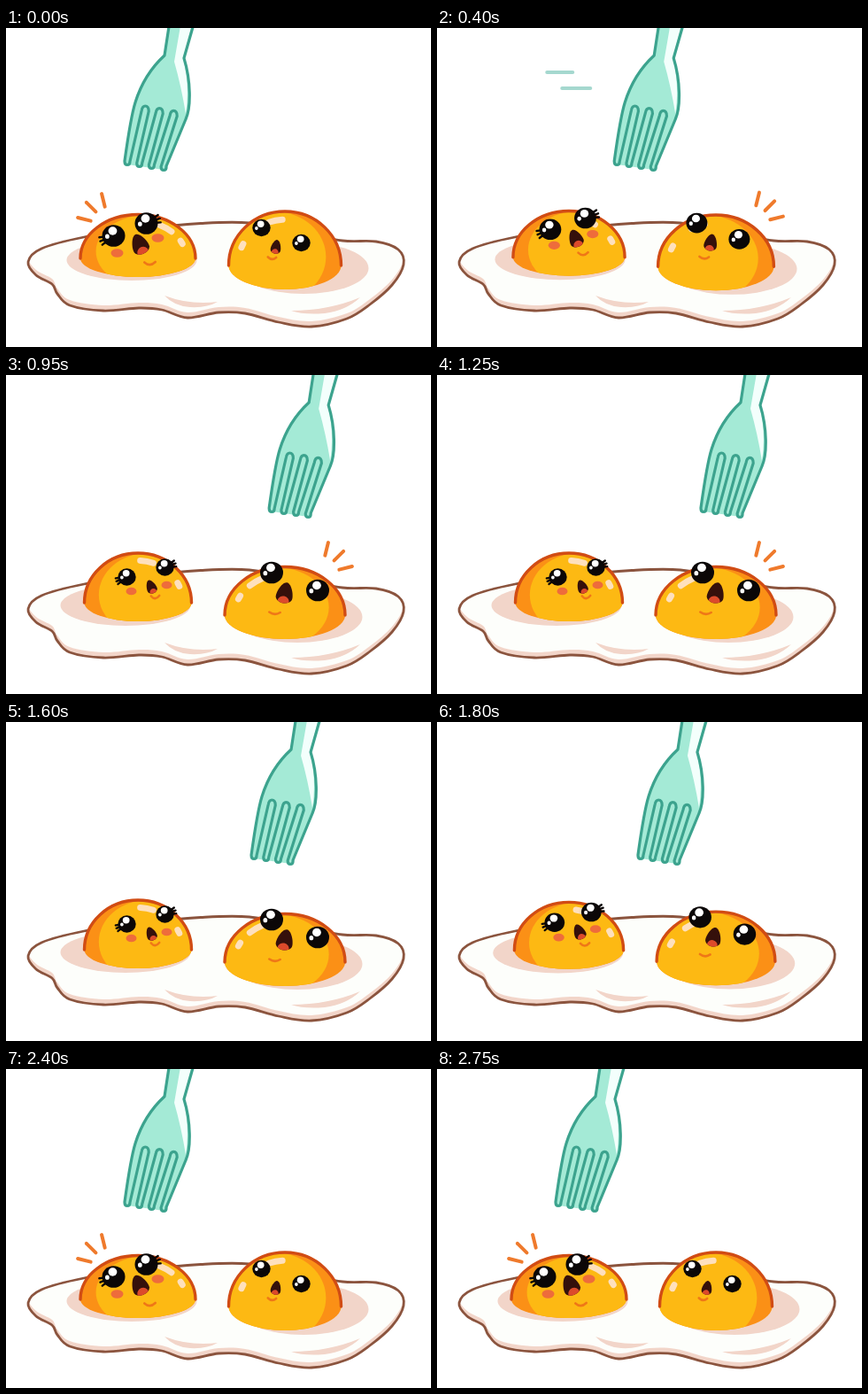
These frames come from a looping animation (480x360 px, 2800 ms). An HTML page with a canvas:

```html
<!DOCTYPE html>
<html lang="en">
<head>
<meta charset="utf-8">
<title>Fried eggs and a fork</title>
<style>
html, body { margin: 0; width: 100%; height: 100%; overflow: hidden; background: #fff; }
canvas { display: block; }
</style>
</head>
<body>
<canvas id="stage" width="480" height="360"></canvas>
<script>
const ctx = document.getElementById('stage').getContext('2d');
const LOOP = 2800, STEP = 50, TRAVEL = 164, DEG = Math.PI / 180;

const INK = '#0b0707', PEACH = '#f2d5c9', RIM = '#d14c14', DEEP = '#fb9016',
      YOLK = '#fdb913', GLOSS = '#fee0bd', ACCENT = '#ef7a2c', TEAL = '#3ca38e', MINT = '#a4ead6';

// Cosine ease from 0 to 1 between two moments; power below 1 gives a quicker start.
function ease(from, to, v, power = 1) {
  const u = Math.min(1, Math.max(0, (v - from) / (to - from)));
  return (1 - Math.cos(Math.PI * u ** power)) / 2;
}

// Smooth closed curve through a few points.
function blob(points) {
  const path = new Path2D(), n = points.length, at = i => points[(i + n) % n];
  path.moveTo(...points[0]);
  points.forEach(([x, y], i) => {
    const [px, py] = at(i - 1), [qx, qy] = at(i + 1), [rx, ry] = at(i + 2);
    path.bezierCurveTo(x + (qx - px) / 6, y + (qy - py) / 6,
                       qx - (rx - x) / 6, qy - (ry - y) / 6, qx, qy);
  });
  path.closePath();
  return path;
}

function forkOutline() {
  const p = new Path2D('M185 -8 L179 31 Q156 52 146 84 Q141 100 134 150');
  for (let i = 0; i < 4; i++) {
    const x = 137 + 13.7 * i, y = 154.5 + 2 * i;
    p.lineTo(x - 3, y - 4);
    p.quadraticCurveTo(x - 3, y, x, y);
    p.quadraticCurveTo(x + 3, y, x + 3, y - 4);
    if (i === 3) break;
    const sx = 157.2 + 16 * i, sy = 88 + 2.7 * i;
    p.lineTo(sx - 4, sy + 5);
    p.quadraticCurveTo(sx - 3, sy, sx, sy);
    p.quadraticCurveTo(sx + 4, sy, sx + 4, sy + 6);
  }
  p.addPath(new Path2D('M181 156 L203 103 C209 90 209 60 201 34 L213 -8'));
  return p;
}

const white = blob([[25, 264], [40, 249], [88, 236], [150, 227], [220, 220.5], [275, 220],
  [335, 231], [380, 240], [418, 241], [443, 250], [449, 267], [436, 290], [411, 312],
  [385, 328], [345, 337], [308, 332], [270, 322], [240, 321], [205, 327], [176, 318],
  [150, 316], [110, 319], [72, 313], [58, 300], [52, 289], [34, 279]]);
const folds = new Path2D(`M179 302 Q208 313 239 309 Q227 316 208 315 Q190 314 179 302 Z
  M322 319 Q364 319 400 304 Q384 319 360 322 Q336 324 322 319 Z`);
const forkLines = forkOutline();
const forkBody = new Path2D(`M185 -8 L179 31 Q156 52 146 84 Q141 100 134 150 L137 154
  L178 160 L181 156 L203 103 C209 90 209 60 201 34 L213 -8 Z`);
const forkShine = new Path2D(`M198 -8 L211 -8 L200 34 Q208 65 203 97 Q198 66 190 38 Z`);

// side points from each yolk towards its light; shift is how fear moves the face.
const eggs = [
  { side: 1, x: 149, y: 257, w: 60.5, h: 56, belly: 21, shade: 14,
    face: [164, 239], shift: [-13, 5], brow: 16.5, spread: 21.5, widen: -3, slant: 5.5, girl: true },
  { side: -1, x: 315, y: 268, w: 63.5, h: 61, belly: 27, shade: 21,
    face: [305, 247], shift: [10, -1], brow: 13, spread: 22.5, widen: 3.5, slant: 8.5 }
];

function ellipse(x, y, rx, ry, color) {
  ctx.beginPath();
  ctx.ellipse(x, y, rx, ry, 0, 0, Math.PI * 2);
  ctx.fillStyle = color;
  ctx.fill();
}

function stroke(color, width, path) {
  ctx.strokeStyle = color;
  ctx.lineWidth = width;
  path ? ctx.stroke(path) : ctx.stroke();
}

function line(x0, y0, x1, y1, color, width) {
  ctx.beginPath();
  ctx.moveTo(x0, y0);
  ctx.lineTo(x1, y1);
  stroke(color, width);
}

function drawWhite() {
  ctx.fillStyle = PEACH;
  ctx.fill(white);
  ctx.save();
  ctx.clip(white);
  ctx.translate(0, -6);
  ctx.fillStyle = '#fdfefb';
  ctx.fill(white);
  ctx.fillRect(60, 215, 340, 60);
  ctx.restore();
  ctx.fillStyle = PEACH;
  ctx.fill(folds);
  stroke('#8b543e', 2.8, white);
}

function drawEye(x, y, r) {
  ellipse(x, y, r, r * .95, INK);
  ellipse(x - r * .08, y - r * .42, r * .38, r * .36, '#fff');
  ellipse(x - r * .55, y + r * .05, r * .18, r * .2, '#fff');
}

function drawLashes(x, y, r, direction) {
  for (let i = -1; i <= 1; i++) {
    const a = direction + i * .28, c = Math.cos(a) * r, n = Math.sin(a) * r;
    line(x + c * .8, y + n * .8, x + c * 1.25, y + n * 1.25, INK, 2.4);
  }
}

function drawMouth(x, y, w, h, tilt) {
  ctx.save();
  ctx.translate(x, y);
  ctx.rotate(tilt);
  ctx.scale(w, h);
  ctx.beginPath();
  ctx.moveTo(0, -1);
  ctx.bezierCurveTo(.55, -1, 1.05, .15, .9, .55);
  ctx.bezierCurveTo(.6, 1.1, -.6, 1.1, -.9, .55);
  ctx.bezierCurveTo(-1.05, .15, -.55, -1, 0, -1);
  ctx.fillStyle = '#35100b';
  ctx.fill();
  ctx.clip();
  ellipse(0, .85, .65, .55, '#dc4a2b');
  ctx.restore();
}

function drawBody({ side, x, y, w, h, belly }, fear) {
  const rx = w + 4.5 * fear, up = h - 6.5 * fear, cy = y + 3 * fear;
  ctx.beginPath();
  ctx.ellipse(x, cy, rx, up, 0, Math.PI, 0);
  ctx.ellipse(x, cy, rx, belly, 0, 0, Math.PI);
  ctx.fillStyle = DEEP;
  ctx.fill();
  ctx.save();
  ctx.clip();
  ellipse(x + side * rx * .19, cy - up * .16, rx * .92, up * .84, YOLK);
  ctx.restore();

  ctx.beginPath();
  ctx.ellipse(x, cy, rx, up, 0, Math.PI, 0);
  stroke(RIM, 3.4);

  // Gloss follows the dome, measured in degrees from its top.
  const shine = (from, to) => {
    ctx.beginPath();
    ctx.ellipse(x, cy, rx * .84, up * .85, 0, (side * from - 90) * DEG, (side * to - 90) * DEG, side < 0);
    stroke(GLOSS, 7);
  };
  shine(3 + 24 * fear, 20 + 24 * fear);
  shine(62, 67);
}

function drawFace(egg, fear, hop) {
  const { side, face, shift, brow, spread, widen, slant, girl } = egg;
  const x = face[0] + shift[0] * fear, y = face[1] + shift[1] * fear - 4.5 * hop;
  const r = 10.2 + 2.8 * fear + .6 * hop;
  const eyeX = x - side * (6 + 5 * fear), eyeY = y - brow;

  for (const end of [-1, 1]) {
    const ex = eyeX + end * (spread + widen * fear);
    const ey = eyeY - end * side * (slant + 1.5 * fear);
    if (girl) {
      ellipse(x - 2.5 + end * (20 + 3 * fear), y + 1.5 - end * (3.5 + 5 * fear), 6 + fear, 4.3 + fear * .5, '#ee6c3b');
      drawLashes(ex, ey, r, end < 0 ? 2.75 : -.35);
    }
    drawEye(ex, ey, r);
  }

  drawMouth(x, y, 6.2 + 4 * fear, 8 + 4 * fear, girl ? -.4 : .2);

  const sx = x + side * (4.5 + 7 * fear), sy = y + 11 + 10 * fear, sw = 4.7 + 1.5 * fear;
  ctx.beginPath();
  ctx.moveTo(sx - sw, sy - side * .5);
  ctx.quadraticCurveTo(sx, sy + 5, sx + sw, sy - side);
  stroke('#ef7717', 2.6);
}

// Three alarm strokes fanning out from the upper outside of a yolk.
function drawAccents(x, y, side) {
  for (let i = 0; i < 3; i++) {
    const a = (-76 + 31 * i) * DEG, c = side * Math.cos(a), n = Math.sin(a);
    line(x + c * 22, y + n * 22, x + c * 37, y + n * 37, ACCENT, 4);
  }
}

function drawFork(x) {
  ctx.save();
  ctx.translate(x, 0);
  ctx.fillStyle = MINT;
  ctx.fill(forkBody);
  ctx.fillStyle = '#f3fffc';
  ctx.fill(forkShine);
  stroke(TEAL, 3.2, forkLines);
  ctx.restore();
}

function draw(t) {
  const x = TRAVEL * (ease(0, 1000, t, .9) - ease(1393, 2283, t));
  const turn = ease(10, 134, x), hop = 4 * turn * (1 - turn);
  const fearOf = egg => egg.side > 0 ? 1 - turn : turn;

  ctx.fillStyle = '#fff';
  ctx.fillRect(0, 0, 480, 360);
  ctx.lineCap = ctx.lineJoin = 'round';
  drawWhite();
  for (const egg of eggs) {
    const fear = fearOf(egg);
    ellipse(egg.x - egg.side * (egg.shade - 7 * fear), egg.y + 3 + 2 * fear, 73.5, egg.belly + 2, PEACH);
    drawBody(egg, fear);
    drawFace(egg, fear, hop);
  }

  if (t < 150 || t >= 1950) drawAccents(117, 223, -1);
  else if (t >= 350 && t < 1450) drawAccents(355, 219 + 6 * turn, 1);

  if (t >= 300 && t < 500) {
    line(x + 58, 50, x + 87, 50, '#a5d8cf', 4);
    line(x + 75, 68, x + 107, 68, '#a5d8cf', 4);
  }
  drawFork(x);
}

const start = performance.now();
function tick() {
  const t = (performance.now() - start) % LOOP;
  draw(Math.floor(t / STEP) * STEP);
  requestAnimationFrame(tick);
}
tick();
</script>
</body>
</html>
```
